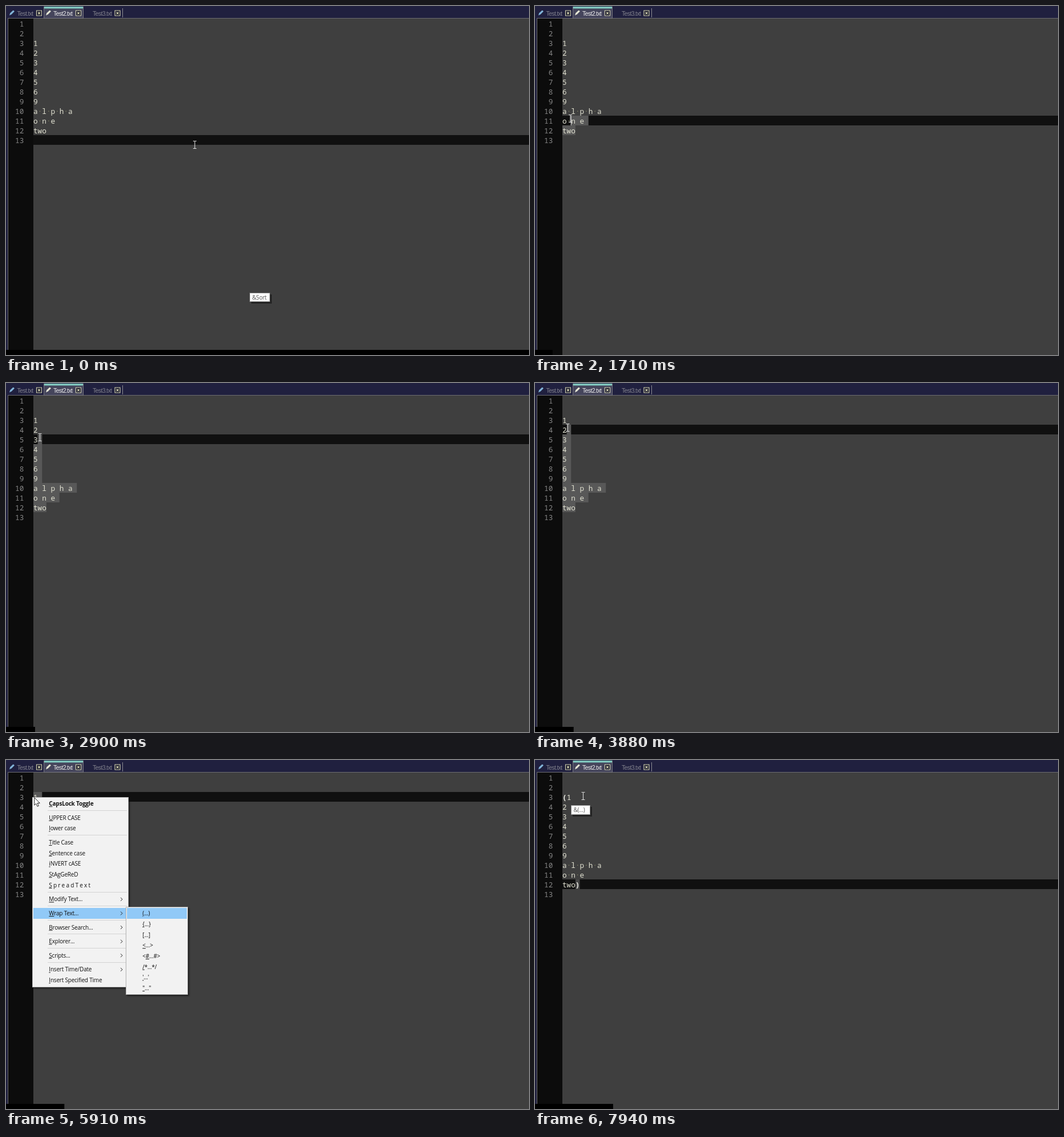
Recreate the animation shown at these times as an HTML page. Size 917 by 611 pixels, loop 8000 ms.

```html
<!DOCTYPE html>
<html lang="en">
<head>
<meta charset="utf-8">
<title>Editor: wrap selected text</title>
<style>
html, body { margin: 0; width: 100%; height: 100%; overflow: hidden; background: #3f3f3f; }
svg { display: block; width: 100%; height: 100%; }
text { white-space: pre; }
.code { font: 12.7px "Noto Sans Mono", monospace; fill: #e2e2d2; }
.nums { fill: #868686; text-anchor: end; }
.brace { font-weight: bold; fill: #f2f2ea; }
.tab { font: 10.5px "Liberation Sans", sans-serif; letter-spacing: -.65px; fill: #81818c; }
.ui { font: 10px "Open Sans", sans-serif; letter-spacing: -.2px; fill: #111; }
.tip { fill: #575757; }
.key { text-decoration: underline; }
.panel { fill: #f2f2f2; stroke: #b4b4b4; filter: drop-shadow(2px 2px 1.5px rgba(0, 0, 0, .55)); }
</style>
</head>
<body>
<svg id="stage" viewBox="0 0 917 611" preserveAspectRatio="none"></svg>
<script>
const LOOP = 8000, FIRST = 30, STEP = 70;
const LEFT = 48, TOP = 22, ROW = 17, CHAR = 7.62;
const LINES = ['', '', '1', '2', '3', '4', '5', '6', '9', 'a l p h a', 'o n e', 'two', ''];
const ANCHOR = 12;
const PRESS = 1360, DRAG = 1500, MENU = 5210, SUBMENU = 5490, WRAP = 6260;

// time, x, y of the pointer
const PATH = [
  [0, 331, 243], [30, 290, 244], [100, 200, 242], [170, 125, 237], [240, 84, 232], [310, 70.5, 230],
  [590, 70.5, 230], [870, 73.5, 223], [940, 73.5, 223], [1150, 76.5, 219], [1430, 76.5, 219],
  [1710, 62, 197], [2270, 53, 146], [2340, 51.5, 134], [2900, 59.5, 95], [3110, 61, 83],
  [3500, 65, 79], [3950, 56, 78], [4300, 51, 70], [4650, 48, 65], [WRAP, 49, 65.5],
  [6470, 51, 66], [6900, 68, 68], [7310, 86, 68], [7660, 84.5, 63], [LOOP, 84.5, 63]
];

const rowTop = n => TOP + ROW * (n - 1);
const rect = (x, y, w, h, fill, more = '') =>
  `<rect x="${x}" y="${y}" width="${w}" height="${h}" fill="${fill}" ${more}/>`;
const text = (x, y, cls, body, more = '') => `<text x="${x}" y="${y}" class="${cls}" ${more}>${body}</text>`;
const esc = s => s.replace(/&/g, '&amp;').replace(/</g, '&lt;').replace(/>/g, '&gt;');

function pencil(x, color) {
  return `<path d="M${x} 16.5l1.2-4 5-4.7q1.7-.6 2.6 1.6l-5 5z" fill="${color}"/>`;
}

function tab(x, closeX, label, color) {
  return text(x, 16.5, 'tab', label, color ? `style="fill:${color}"` : '') +
    `<path d="M${closeX - 4.5} 8h9v9h-9zM${closeX - 2} 10.5l4 4m0-4l-4 4" fill="#17172b" stroke="#d8d8b4" stroke-width="1.1"/>`;
}

function tooltip(id, x, y, w, h, label) {
  return `<g id="${id}">` +
    rect(x + 3, y + 3, w, h, '#000', 'opacity=".45"') +
    rect(x + .5, y + .5, w - 1, h - 1, '#fff', 'stroke="#868686"') +
    text(x + 4.5, y + 11.8, 'ui tip', esc(label)) + '</g>';
}

// "&" marks the access key, "-" a separator, a trailing ">" a submenu
const MENU_ITEMS = ['&CapsLock Toggle', '-', '&UPPER CASE', '&lower case', '-', '&Title Case',
  '&Sentence case', '&iNVERT cASE', '&StAgGeReD', '&S p r e a d T e x t', '-', '&Modify Text...|', '-',
  '&Wrap Text...|', '-', '&Browser Search...|', '-', '&Explorer...|', '-', '&Scripts...|', '-',
  '&Insert Time/Date|', '&Insert Specified Time'];
const WRAP_ITEMS = ['&(...)', '&{...}', '&[...]', '&<...>', '<&#...#>', '&/*...*/', "&'...'", '&"..."'];

function menu(id, x, y, w, h, items, chosen) {
  const ITEM = 18.7, GAP = 5.9;
  let top = y + 2.2;
  let out = `<g id="${id}"><rect class="panel" x="${x + .5}" y="${y + .5}" width="${w - 1}" height="${h - 1}"/>`;
  for (const item of items) {
    if (item === '-') {
      out += rect(x + 27, Math.round(top + 2), w - 30, 1, '#d3d3d3');
      top += GAP;
      continue;
    }
    const [label, sub] = item.split('|');
    const at = label.indexOf('&'), mid = top + ITEM / 2;
    if (item === chosen) out += rect(x + 2, Math.round(top), w - 4, 19, '#91c9f7');
    const body = esc(label.slice(0, at)) + `<tspan class="key">${esc(label[at + 1])}</tspan>` + esc(label.slice(at + 2));
    out += text(x + 29.3, mid + 3.6, 'ui', body, label.includes('CapsLock') ? 'font-weight="700" style="font-weight:700"' : '');
    if (sub !== undefined) out += `<path d="M${x + 155} ${mid - 3}l3 3-3 3" fill="none" stroke="#222"/>`;
    top += ITEM;
  }
  return out + '</g>';
}

function build() {
  let dots = '', code = '';
  LINES.forEach((line, i) => {
    const y = rowTop(i + 1);
    [...line].forEach((c, k) => {
      if (c === ' ') dots += rect(LEFT + CHAR * (k + .5) - .6, y + 8.6, 1.3, 1.3, '#8a8a68');
    });
    code += text(31.3, y + 14, 'code nums', i + 1) + text(LEFT, y + 14, 'code', line, `id="line${i + 1}"`);
  });
  return rect(0, 0, 917, 611, '#3f3f3f') +
    rect(0, 0, 917, 21, '#20203f') + rect(0, 21, 4, 590, '#20203f') +
    rect(4, 22, 44, 589, '#0c0c0c') +
    rect(3, 21, 914, 1, '#6c6c70') + rect(3, 21, 1, 590, '#6c6c70') +
    rect(66.5, 1.5, 69, 20, '#45455c', 'stroke="#77777f"') + rect(67, 1, 68, 3.5, '#7fc6bd') +
    pencil(6, '#82b4d8') + tab(19.5, 58, 'Test.txt') +
    pencil(70, '#e4e6d4') + tab(83, 127, 'Test2.txt', '#ececec') +
    tab(152, 195.5, 'Test3.txt') + rect(204, 4, 1, 16, '#8c8c94') +
    rect(LEFT, 0, 869, ROW, '#101010', 'id="active"') + dots +
    '<path id="selection" fill="#585858"/>' +
    rect(LEFT + 3 * CHAR, rowTop(12), CHAR, ROW, '#454545', 'id="braceBack"') + code +
    rect(0, 0, 1, ROW, '#e8e8e8', 'id="caret"') +
    rect(0, 602, 0, 9, '#000', 'id="bar"') +
    tooltip('sortTip', 427, 502, 36, 16, '&Sort') +
    tooltip('wrapTip', 63, 79, 34, 17, '&(...)') +
    menu('mainMenu', 46, 65, 169, 333, MENU_ITEMS, '&Wrap Text...|') +
    menu('subMenu', 210, 257, 109, 154, WRAP_ITEMS, WRAP_ITEMS[0]) +
    '<g id="beam" fill="none"><path d="M-3-6.5h2.2l.8.7.8-.7H3M0-6V6M-3 6.5h2.2l.8-.7.8.7H3" stroke="#d9d9d9" stroke-width="1.1"/></g>' +
    '<path id="arrow" d="M0 0v13.2l3-2.8 2.2 5 2.3-1-2.2-4.8h4.2z" fill="#fff" stroke="#111" stroke-width=".9"/>';
}

const stage = document.getElementById('stage');
stage.innerHTML = build();
const el = {};
stage.querySelectorAll('[id]').forEach(n => el[n.id] = n);
const show = (id, on) => el[id].setAttribute('display', on ? 'inline' : 'none');
const set = (id, name, value) => el[id].setAttribute(name, value);

function pointer(t) {
  const i = Math.max(1, PATH.findIndex(p => p[0] >= t));
  const [t0, x0, y0] = PATH[i - 1], [t1, x1, y1] = PATH[i];
  const k = (t - t0) / (t1 - t0);
  return [x0 + (x1 - x0) * k, y0 + (y1 - y0) * k];
}

function caretAt(t, x, y) {
  if (t < PRESS) return [13, 0];
  if (t >= WRAP) return [12, 4];
  if (t < DRAG) return [12, 3];
  const row = Math.min(ANCHOR, Math.floor((y - TOP) / ROW) + 1);
  const col = Math.round((x - LEFT) / CHAR);
  return [row, Math.max(0, Math.min(LINES[row - 1].length, col))];
}

function selection(row, col) {
  let d = '';
  for (let n = row; n <= ANCHOR; n++) {
    const from = LEFT + CHAR * (n === row ? col : 0);
    const to = LEFT + CHAR * (LINES[n - 1].length + (n < ANCHOR ? 1 : 0));
    d += `M${from} ${rowTop(n)}H${to}v${ROW}H${from}z`;
  }
  return d;
}

let wasWrapped = null;
function wrapLines(on) {
  if (on === wasWrapped) return;
  wasWrapped = on;
  const brace = c => on ? `<tspan class="brace">${c}</tspan>` : '';
  el.line3.innerHTML = brace('(') + '1';
  el.line12.innerHTML = 'two' + brace(')');
}

function draw(time) {
  const t = time < FIRST ? 0 : FIRST + Math.floor((time - FIRST) / STEP) * STEP;
  const [x, y] = pointer(t);
  const [row, col] = caretAt(t, x, y);
  const wrapped = t >= WRAP, menuOpen = t >= MENU && !wrapped;

  set('active', 'y', rowTop(row));
  set('selection', 'd', t >= DRAG && !wrapped ? selection(row, col) : '');
  set('caret', 'x', LEFT + CHAR * col - .5);
  set('caret', 'y', rowTop(row));
  set('bar', 'width', t < FIRST ? 917 : 1.5 + t * .01706);
  set('beam', 'transform', `translate(${x} ${y})`);
  set('arrow', 'transform', `translate(${x + 1} ${y + .5})`);

  wrapLines(wrapped);
  show('caret', t >= PRESS && t < PRESS + 500);
  show('braceBack', wrapped);
  show('sortTip', t < 100);
  show('wrapTip', wrapped);
  show('mainMenu', menuOpen);
  show('subMenu', menuOpen && t >= SUBMENU);
  show('arrow', menuOpen);
  show('beam', !menuOpen);
}

const start = performance.now();
function tick() {
  draw((performance.now() - start) % LOOP);
  requestAnimationFrame(tick);
}
tick();
</script>
</body>
</html>
```
